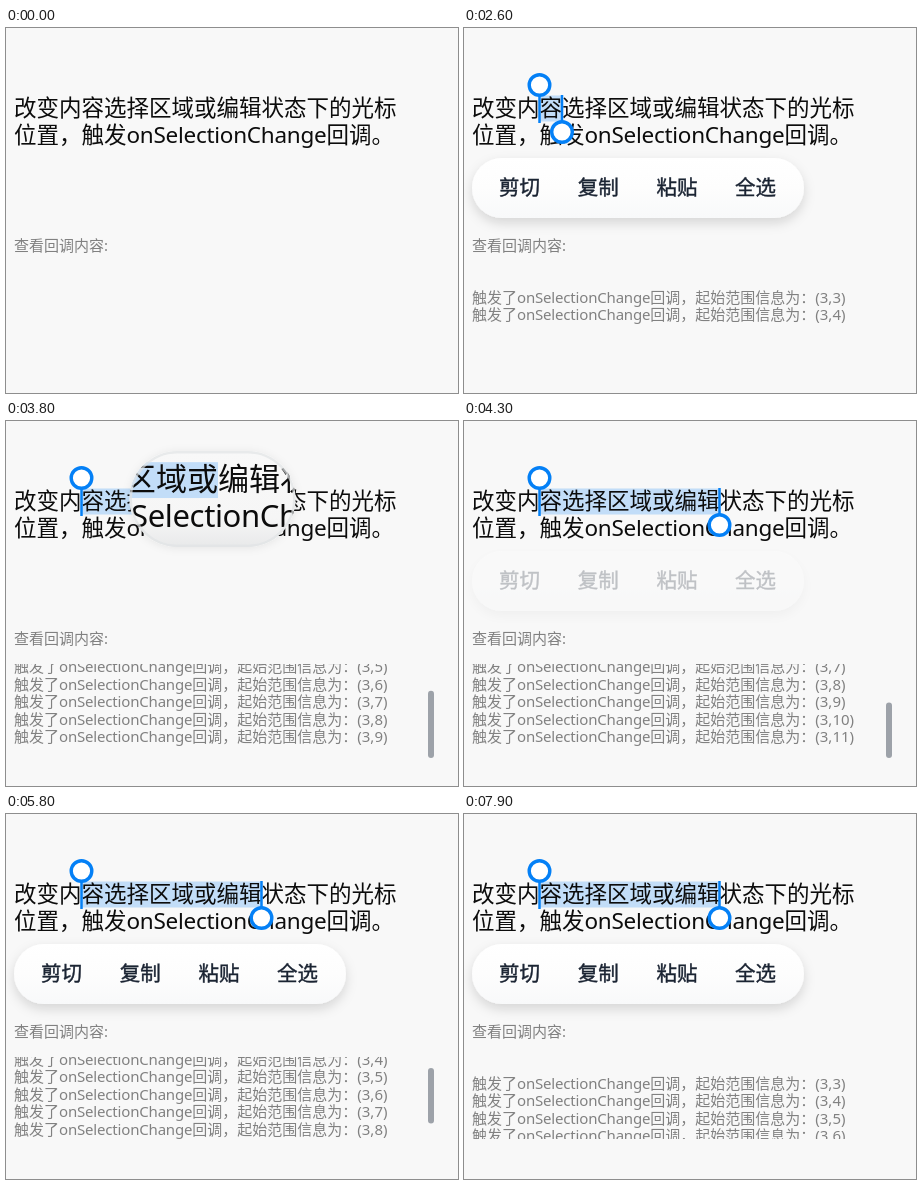
An HTML page for the animation above (8200 ms loop, 452 by 365 pixels).

```html
<!DOCTYPE html>
<html lang="zh-CN">
<head>
<meta charset="utf-8">
<style>
html, body { margin: 0; width: 100%; height: 100%; overflow: hidden; background: #f8f8f8; }
svg { display: block; width: 452px; height: 365px; }
text { font-family: 'Noto Sans', 'Noto Sans CJK SC', 'Noto Sans CJK', sans-serif; }
.main { font-size: 22.5px; fill: #0c0c0c; }
.note { font-size: 15px; fill: #818181; }
.btn { font-size: 20.5px; fill: #1b2433; stroke: #1b2433; stroke-width: .4px; text-anchor: middle;
  font-family: 'Noto Sans CJK SC', 'Noto Sans CJK', sans-serif; }
.lat { letter-spacing: -.012em; }
</style>
</head>
<body>
<svg viewBox="0 0 452 365">
  <defs>
    <clipPath id="view"><rect x="0" y="243" width="420" height="82"/></clipPath>
    <clipPath id="capsule"><rect x="-83" y="-48" width="166" height="96" rx="48"/></clipPath>
    <linearGradient id="sheen" x2="0" y2="1">
      <stop offset="0" stop-color="#fff"/><stop offset=".5" stop-color="#fdfdfd"/>
      <stop offset="1" stop-color="#f8f9fa"/>
    </linearGradient>
    <linearGradient id="glass" x2="0" y2="1">
      <stop offset="0" stop-color="#f8f8f8"/><stop offset=".7" stop-color="#f6f6f6"/>
      <stop offset="1" stop-color="#e8e9ea"/>
    </linearGradient>
    <filter id="soft" x="-20%" y="-50%" width="140%" height="220%">
      <feDropShadow dx="0" dy="5" stdDeviation="6" flood-color="#000" flood-opacity=".14"/>
    </filter>
    <filter id="halo" x="-20%" y="-30%" width="140%" height="160%">
      <feDropShadow dx="0" dy="1" stdDeviation="4" flood-color="#000" flood-opacity=".08"/>
    </filter>
  </defs>
  <rect width="452" height="365" fill="#f8f8f8"/>
  <g id="page">
    <rect id="mark" y="67.5" height="26" fill="#c2ddf8"/>
    <text class="main" x="8" y="87.6">改变内容选择区域或编辑状态下的光标</text>
    <text class="main" x="8" y="114.6">位置，触发<tspan class="lat">onSelectionChange</tspan>回调。</text>
  </g>
  <text class="note" x="8" y="223.3">查看回调内容:</text>
  <g clip-path="url(#view)"><g id="log"></g></g>
  <rect id="bar" x="422" width="6" rx="3" fill="#9da2a9"/>
  <rect id="caret" x="75" y="68" width="2.5" height="27" fill="#007dff"/>
  <g id="menu">
    <rect x="8" y="130" width="332" height="60" rx="30" fill="url(#sheen)" filter="url(#soft)"/>
  </g>
  <g id="handles" fill="#fff" stroke="#0480f6">
    <path d="M75.5 67V95" stroke-width="2.5"/>
    <circle cx="75.5" cy="57" r="10.3" stroke-width="3.4"/>
    <g id="end">
      <path d="M0 67V95" stroke-width="2.5"/>
      <circle cy="104" r="10.3" stroke-width="3.4"/>
    </g>
  </g>
  <g id="lens">
    <rect x="-83" y="-48" width="166" height="96" rx="48" fill="url(#glass)" filter="url(#halo)"/>
    <g clip-path="url(#capsule)">
      <use id="zoom" href="#page"/>
      <rect x="-83" y="-48" width="166" height="96" rx="48" fill="none" stroke="#e2e4e6" stroke-width="5" stroke-opacity=".7"/>
    </g>
  </g>
</svg>
<script>
const LOOP = 8200, LEFT = 8, CHAR = 22.5, ROW = 17.5, TRACK = 105, ZOOM = 1.38, LENS_Y = 78;
const $ = id => document.getElementById(id);
const NS = 'http://www.w3.org/2000/svg';

function addText(parent, cls, x, y, html) {
  const el = document.createElementNS(NS, 'text');
  el.setAttribute('class', cls);
  el.setAttribute('x', x);
  el.setAttribute('y', y);
  el.innerHTML = html;
  parent.append(el);
  return el;
}

const rows = Array.from({ length: 9 }, (_, i) => addText($('log'), 'note', LEFT, 274.8 + i * ROW,
  `触发了<tspan class="lat">onSelectionChange</tspan>回调，起始范围信息为：(3,${i + 3})`));
['剪切', '复制', '粘贴', '全选'].forEach((s, i) => addText($('menu'), 'btn', 55.5 + i * 78.7, 167, s));

// [time, finger x, sampled y]
const drag = [[3200, 106, 85], [3400, 152, 87.2], [3800, 206.5, 94.2], [4000, 246, 95]];

function finger(t) {
  if (t >= 4000) return drag[3].slice(1);
  const i = drag.findIndex(k => k[0] > t), a = drag[i - 1], b = drag[i];
  const p = (t - a[0]) / (b[0] - a[0]);
  return [1, 2].map(j => a[j] + (b[j] - a[j]) * p);
}

function show(el, on) { el.style.display = on ? '' : 'none'; }
function set(el, attrs) { for (const k in attrs) el.setAttribute(k, attrs[k]); }

function render(time) {
  const t = Math.floor(time / 100) * 100;
  const selecting = t >= 2200, dragging = t >= 3200 && t < 4300;

  let end = t < 1300 ? 2 : t < 2200 ? 3 : t < 3200 ? 4 : 11;
  if (dragging) {
    const [x, y] = finger(t);
    end = Math.round((x - LEFT) / CHAR);
    set($('lens'), { transform: `translate(${x} ${LENS_Y})` });
    set($('zoom'), { transform: `scale(${ZOOM}) translate(${-x} ${-y})` });
  }
  show($('lens'), dragging);

  const endX = LEFT + end * CHAR;
  set($('mark'), { x: 75.5, width: selecting ? endX - 75.5 : 0 });
  set($('end'), { transform: `translate(${endX} 0)` });
  show($('handles'), selecting);
  show($('caret'), t >= 1300 && t < 1800);

  let fade = 0;
  if (t >= 4300) fade = (t - 4200) / 400;
  else if (selecting && !dragging) fade = (t - 2100) / 500;
  $('menu').style.opacity = Math.min(1, fade);

  const count = end - 2;
  rows.forEach((r, i) => show(r, i < count));
  const range = Math.max(0, count * ROW - 63.75);
  const back = Math.min(1, Math.max(0, (t - 5700) / 300));
  const scroll = range * (1 - back) ** 2;
  set($('log'), { transform: `translate(0 ${-scroll})` });

  const size = TRACK * TRACK / (TRACK + range);
  show($('bar'), range > 0 && t < 7900);
  set($('bar'), { y: 232 + (range ? scroll / range : 0) * (TRACK - size), height: size });
}

const start = performance.now();
function tick() {
  render((performance.now() - start) % LOOP);
  requestAnimationFrame(tick);
}
tick();
</script>
</body>
</html>
```
